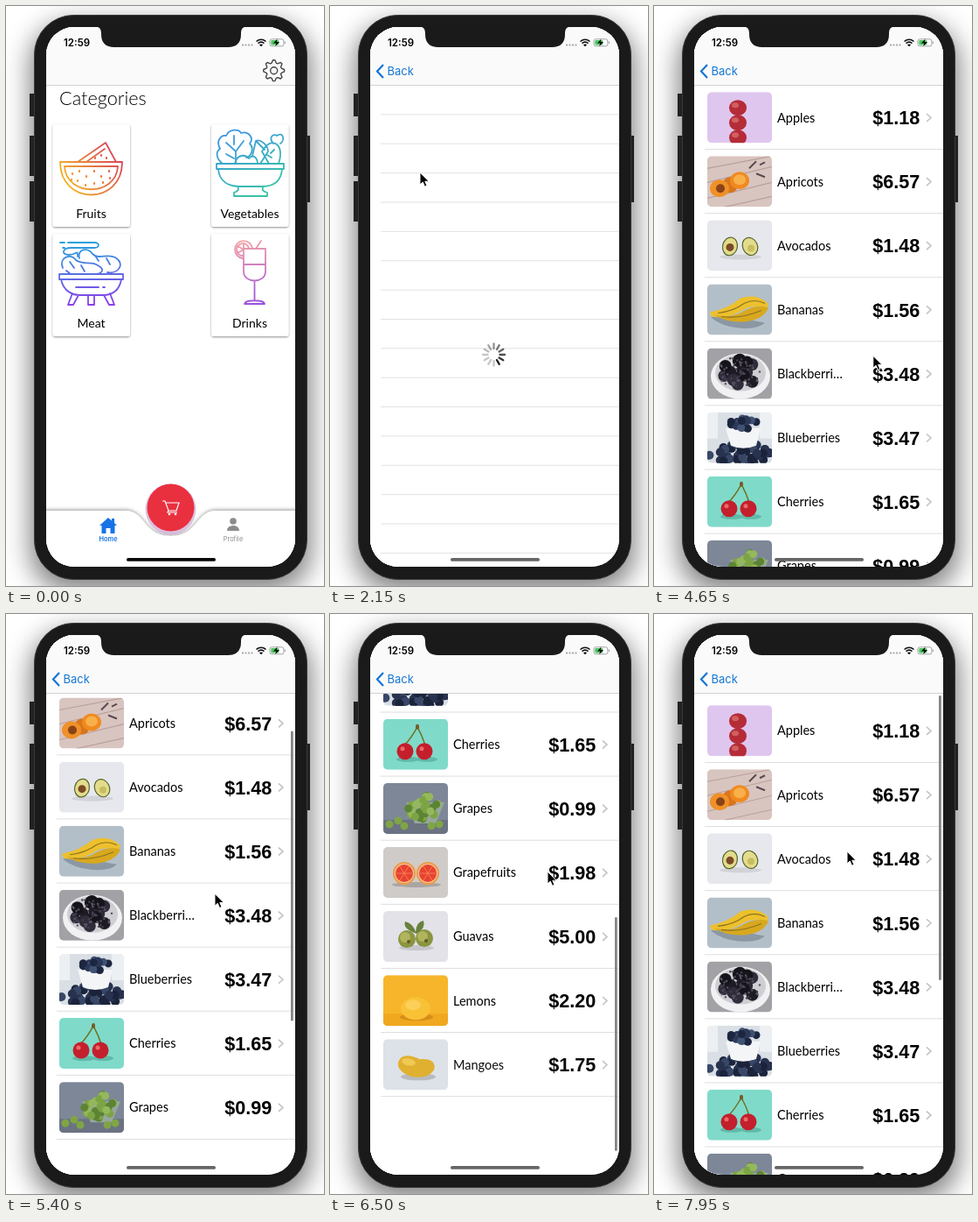
An HTML page that plays this animation: 364x662 px, repeating every 8 s.

```html
<!DOCTYPE html>
<html lang="en">
<head>
<meta charset="utf-8">
<title>Grocery app</title>
<style>
html, body { margin: 0; width: 100%; height: 100%; overflow: hidden; background: #fff; }
svg { display: block; width: 100%; height: 100%; }
text { font-family: Lato, "Open Sans", sans-serif; }
.ui { font-family: Inter, Roboto, sans-serif; }
.name { font-size: 14.5px; }
.price { font: bold 21.6px "Liberation Sans", Arial, sans-serif; text-anchor: end; }
.label { font-size: 14px; text-anchor: middle; }
.tab { font: 600 7.4px Inter, sans-serif; text-anchor: middle; }
.line { fill: none; stroke-width: 1.8; stroke-linecap: round; stroke-linejoin: round; }
</style>
</head>
<body>
<svg viewBox="0 0 364 662">
  <defs>
    <clipPath id="screen"><rect x="46" y="24" width="285" height="616" rx="32"/></clipPath>
    <clipPath id="photo"><rect width="74" height="58" rx="5"/></clipPath>
    <filter id="halo" x="-30%" y="-20%" width="160%" height="140%"><feGaussianBlur stdDeviation="15"/></filter>
    <filter id="cardShadow"><feDropShadow dx="0" dy="1" stdDeviation="1" flood-opacity=".45"/></filter>
    <filter id="barShadow" y="-50%" height="200%"><feDropShadow dx="0" dy="-1" stdDeviation="2" flood-opacity=".4"/></filter>
    <linearGradient id="fruitInk" gradientUnits="userSpaceOnUse" x1="62" y1="210" x2="130" y2="165"><stop stop-color="#f5c21c"/><stop offset="1" stop-color="#d83f5e"/></linearGradient>
    <linearGradient id="vegInk" gradientUnits="userSpaceOnUse" x1="250" y1="142" x2="290" y2="217"><stop stop-color="#3f92e8"/><stop offset="1" stop-color="#38c4a4"/></linearGradient>
    <linearGradient id="meatInk" gradientUnits="userSpaceOnUse" x1="90" y1="268" x2="98" y2="340"><stop stop-color="#25a3dc"/><stop offset="1" stop-color="#8a3fe8"/></linearGradient>
    <linearGradient id="drinkInk" gradientUnits="userSpaceOnUse" x1="270" y1="268" x2="286" y2="340"><stop stop-color="#f4a3a8"/><stop offset="1" stop-color="#9a50dc"/></linearGradient>
  </defs>

  <rect x="28" y="20" width="321" height="648" rx="46" opacity=".5" filter="url(#halo)"/>
  <path d="M27 100h6v26h-6zM27 148h6v46h-6zM27 200h6v46h-6zM344 148h4v76h-4z" fill="#222"/>
  <rect x="32.5" y="10.5" width="312" height="644" rx="45" fill="#1a1a1a" stroke="#3a3a3a"/>

  <g clip-path="url(#screen)">
    <rect x="46" y="24" width="285" height="616" fill="#fff"/>
    <g id="home">
      <rect x="46" y="24" width="285" height="616" fill="#fff"/>
      <text x="61" y="113" font-size="21.7" font-weight="300">Categories</text>
      <g id="cards"></g>

      <g class="line" stroke="url(#fruitInk)">
        <path d="M62 178H133C133 228 62 228 62 178ZM67 183H128C126 218 69 218 67 183M82 178L114 156L126 178M92 178L113 163"/>
        <path d="M76 191v1M84 188v1M92 194v1M101 188v1M109 194v1M118 188v1M82 199v1M91 204v1M101 202v1M111 201v1M102 173v1M109 170v1M115 173v1M75 198v1M119 196v1" stroke-width="2.2"/>
      </g>
      <g class="line" stroke="url(#vegInk)">
        <path d="M241 180H318V186H241ZM243 186C244 201 256 206 266 206H293C306 206 315 200 316 186M265 206Q268 211 261 213V217H299V213Q291 211 295 206"/>
        <path d="M248 180C240 174 240 166 245 163C240 154 246 147 252 148C255 140 267 140 269 145C278 142 284 151 279 157C285 163 280 172 275 173M252 156L263 166V179M263 166L272 154M252 169L261 174M261 148V158"/>
        <path d="M262 180C264 169 274 169 278 174C283 168 288 174 288 180M282 171L286 154L296 164M286 154C292 151 300 160 300 166L291 180M301 180L293 166Q302 152 310 158Q317 164 312 180M306 157C300 150 306 145 310 148C317 143 320 153 314 157M299 170l5 3M307 164l-4 4"/>
      </g>
      <g class="line" stroke="url(#meatInk)">
        <path d="M61 306H134V312H61ZM63 312C66 327 78 330 84 330H111C123 330 130 323 132 312M76 328L71 341H77L83 330M112 330L118 341H124L119 328M94 330V341H101V330"/>
        <path d="M65 299C60 286 75 282 80 290C88 296 99 291 105 296C115 301 109 306 101 306M84 288C81 277 94 275 99 283C106 290 116 282 125 287C137 294 129 306 116 304M73 292l5 7M86 296l4 7M102 285l4 6M115 288l4 7M74 306l-5-4"/>
        <path d="M62 270H67M71 270H101C108 270 107 276 101 276H75C64 276 63 284 72 284C81 284 82 277 82 286M65 276h2M80 321h26M111 321h2"/>
      </g>
      <g class="line" stroke="url(#drinkInk)" stroke-width="1.5">
        <path d="M272 277H297V303C297 317 272 317 272 303ZM272 295H297M284.500 314V336M273 340C274 335 295 335 296 340ZM286 277L292 268"/>
        <path d="M271 288A10 10 0 1 1 282 277M271 285A7 7 0 1 1 278 277M272 278L265 274M272 278V271M272 278L265 282"/>
      </g>

      <path d="M40 576H136C160 576 157 605 188.500 605S217 576 241 576H337V650H40Z" fill="#fff" filter="url(#barShadow)"/>
      <circle cx="188.500" cy="574.500" r="29" fill="#c9a2d2" opacity=".65"/>
      <circle cx="188.500" cy="572.500" r="27" fill="#e9303f"/>
      <path d="M179 565H182L186 576H195L198 567H183M186 576L185 578H196" fill="none" stroke="#fff" stroke-width="1.200"/>
      <circle cx="187" cy="580" r="1.300" fill="#fff"/><circle cx="194" cy="580" r="1.300" fill="#fff"/>
      <path d="M107 593L117 584L121 587.500V585H124V590L127 593H124.500V602H119.500V596H114.500V602H109.500V593Z" fill="#1673e6"/>
      <text class="tab" x="117" y="611" fill="#1673e6">Home</text>
      <circle cx="260" cy="588" r="3.800" fill="#8c8c8c"/><path d="M253 599C253 591 267 591 267 599Z" fill="#8c8c8c"/>
      <text class="tab" x="260" y="611" fill="#8c8c8c" style="font-weight:400">Profile</text>
    </g>

    <g id="list">
      <rect x="46" y="24" width="285" height="616" fill="#fff"/>
      <path id="emptyLines" stroke="#e2e2e2"/>
      <g id="rows"></g>
      <rect id="scrollbar" x="326" width="2.800" rx="1.400" fill="#858585"/>
      <g id="spinner" transform="translate(187.500 398)"></g>
    </g>

    <rect x="46" y="24" width="285" height="66.500" fill="#fafafa"/>
    <path d="M46 90.500H331" stroke="#d2d2d4"/>
    <g id="gear" fill="none" stroke="#444" stroke-width="1.400" transform="translate(306.700 73.700)"></g>
    <g id="back" fill="#1477d4">
      <path d="M61 67L54 74.500L61 82" fill="none" stroke="#1477d4" stroke-width="2.200"/>
      <text class="ui" x="65.500" y="79" font-size="13">Back</text>
    </g>
    <text class="ui" x="66" y="45.500" font-size="11.500" font-weight="600">12:59</text>
    <path d="M270 44.500h2m1.500 0h2m1.500 0h2m1.500 0h2" stroke="#aaa" stroke-width="2"/>
    <path d="M286.500 40.500Q292 36 297.500 40.500M288.500 42.700Q292 39.700 295.500 42.700" fill="none" stroke="#111" stroke-width="1.600"/><path d="M290 44.300Q292 42.600 294 44.300L292 46.300Z"/>
    <rect x="302" y="37.800" width="15.800" height="8" rx="2.200" fill="#fff" stroke="#999" stroke-width=".9"/>
    <rect x="303.300" y="39.100" width="9" height="5.400" rx="1" fill="#48c860"/>
    <path d="M310.500 37.500L306 42.500H309.200L308.200 46L313 41H309.600Z"/><path d="M319.300 40.500v2.600" stroke="#999"/>
    <rect id="indicator" x="138" y="630" width="102" height="3.800" rx="1.900"/>
  </g>
  <path d="M102 23.500C108 24 109 27 109 32Q109 47 124 47H254Q269 47 269 32C269 27 270 24 276 23.500Z" fill="#1a1a1a"/>
  <path id="cursor" d="M0 0V14L3.300 11L5.500 16.200L8 15.200L5.800 10.200H10.300Z" stroke="#fff" stroke-width="1"/>
</svg>

<script>
const $ = id => document.getElementById(id);
const LOOP = 8000, ROW = 73.1, TOP = 91, MAX_SCROLL = 353, LOADED = 3610;
const clamp = x => Math.max(0, Math.min(1, x));
const smooth = x => (x = clamp(x), x * x * (3 - 2 * x));

// Smooth curve through [time, value] keys, flat at every turning point.
function track(keys) {
  const slope = i => (keys[i + 1][1] - keys[i][1]) / (keys[i + 1][0] - keys[i][0]);
  const tangent = i => {
    if (i === 0 || i === keys.length - 1) return 0;
    const a = slope(i - 1), b = slope(i);
    return a * b <= 0 ? 0 : 2 * a * b / (a + b);
  };
  return t => {
    if (t <= keys[0][0]) return keys[0][1];
    const i = keys.findIndex((k, n) => n < keys.length - 1 && t < keys[n + 1][0]);
    if (i < 0) return keys[keys.length - 1][1];
    const [t0, v0] = keys[i], [t1, v1] = keys[i + 1], d = t1 - t0, u = (t - t0) / d;
    return v0 + (v1 - v0) * u * u * (3 - 2 * u)
      + d * u * (1 - u) * ((1 - u) * tangent(i) - u * tangent(i + 1));
  };
}

const scrollAt = track([[5250, 0], [5400, 75], [5520, 258], [5600, 345], [5720, 392], [6000, 353], [6120, 353],
  [6500, 417], [6700, 404], [7025, 359], [7250, 218], [7400, 90], [7500, 25], [7620, -22], [7950, -6], [8000, -4]]);
const cursorX = track([[100, 372], [850, 103], [3450, 103], [3950, 258], [5250, 241], [5400, 239], [5600, 238],
  [6120, 252], [6500, 249], [7250, 230], [7950, 221]]);
const cursorY = track([[100, 400], [850, 190], [3450, 190], [3950, 401], [5250, 395], [5400, 320], [5560, 110],
  [6120, 426], [6500, 294], [6700, 324], [7025, 414], [7250, 561], [7350, 588], [7950, 271]]);

// Thumbnail drawing, in a 74 by 58 box
const ball = (x, y, r, fill, ry = r, turn = 0) =>
  `<ellipse cx="${x}" cy="${y}" rx="${r}" ry="${ry}" fill="${fill}" transform="rotate(${turn} ${x} ${y})"/>`;
const path = (d, fill, stroke = 'none', width = 1) =>
  `<path d="${d}" fill="${fill}" stroke="${stroke}" stroke-width="${width}"/>`;
function pile(count, x, y, rx, ry, r, fills) {
  let seed = count * 7 + x, out = '';
  const random = () => (seed = (seed * 16807 + 11) % 2147483647) / 2147483647;
  random(); random();
  for (let i = 0; i < count; i++) {
    const a = random() * 6.283, d = Math.sqrt(random());
    out += ball((x + rx * d * Math.cos(a)).toFixed(1), (y + ry * d * Math.sin(a)).toFixed(1), r, fills[i % fills.length]);
  }
  return out;
}
const apple = y => ball(35, y, 10, '#b52c38', 9) + ball(32, y - 3, 4, '#d0605f', 3);
const citrus = x => ball(x, 30, 13, '#ee9a45') + ball(x, 30, 11, '#f3c79c') + ball(x, 30, 10, '#e8432f') +
  path(`M${x - 9} 30h18M${x - 5} 22l10 16M${x + 5} 22l-10 16`, 'none', '#f58a68', .8);
const avocado = (x, turn) => ball(x, 30, 9, '#55682c', 11, turn) + ball(x, 30, 7.8, '#e3dc8c', 9.8, turn);
const guava = (x, y) => ball(x, y, 10, '#8b9440') + ball(x - 2, y - 2, 6, '#b0b45c') + ball(x + 2, y + 3, 2, '#5d5a28');

const fruits = [
  ['Apples', '1.18', '#dfc6ee', apple(52) + apple(35) + apple(18)],
  ['Apricots', '6.57', '#d9c5c0', path('M0 14L74 0M0 30L74 12M0 48L74 30M20 58L74 46', 'none', '#b9a09c', 1.2) +
    path('M48 14l8 -8M56 20l10 4M60 10l6 -3', 'none', '#5a4a50', 2) + ball(26, 33, 9, '#d9761c') +
    ball(37, 28, 11, '#f08a20', 10) + ball(37, 27, 7, '#f7b04a', 6) + ball(14, 37, 11, '#ef9128', 10) + ball(15, 37, 5, '#8a4316')],
  ['Avocados', '1.48', '#e7e8ed', ball(38, 42, 24, '#d2d3d8', 3) + avocado(26, 12) + ball(26, 31, 4.5, '#7b4a26') + avocado(49, -25) + ball(50, 32, 4, '#c9bd62')],
  ['Bananas', '1.56', '#b3bfc8', path('M7 37Q36 38 66 44Q58 52 36 50Q16 48 4 38Z', '#8b98a4') +
    path('M3 32Q24 28 38 16Q58 10 70 23L68 28Q52 22 38 31Q22 40 5 37Z', '#edc02c') +
    path('M8 35Q28 40 43 30Q58 23 70 27Q64 41 42 43Q22 44 8 35Z', '#d8a81e') + path('M12 33Q30 31 42 22Q54 16 66 22M16 37Q38 40 62 30', 'none', '#8d7420', 1.2)],
  ['Blackberri…', '3.48', '#a2a2a6', ball(38, 32, 34, '#f1f1f3', 26) + ball(38, 28, 29, '#cfcfd3', 21) +
    pile(15, 37, 28, 21, 15, 7, ['#1e1b25', '#302c3a', '#16141b']) + pile(60, 37, 28, 25, 18, 1.2, ['#5a5566', '#454151'])],
  ['Blueberries', '3.47', '#d9dfe5', path('M0 0H12V30H0ZM60 0H74V30H60Z', '#edf0f3') + pile(45, 37, 47, 37, 12, 5, ['#27324f', '#384767', '#1b233b']) +
    path('M21 18H61L56 38Q41 44 27 38Z', '#f4f5f6') + pile(18, 41, 14, 17, 7, 4.5, ['#2c3857', '#405274', '#1d2640'])],
  ['Cherries', '1.65', '#80dac9', ball(28, 46, 13, '#61b9aa', 3) + ball(50, 46, 12, '#61b9aa', 3) +
    path('M24 30Q32 22 39 9Q45 20 48 30', 'none', '#6a7526', 1.5) + ball(39, 9, 2, '#7a5a24', 3) +
    ball(25, 37, 9.5, '#c41f2c') + ball(47, 37, 9.5, '#c41f2c') + ball(22, 34, 2.5, '#ea6a68') + ball(44, 34, 2.5, '#ea6a68')],
  ['Grapes', '0.99', '#7d8798', path('M0 42H74V58H0Z', '#6b7282') + path('M26 22H70L60 46H36Z', '#95a79c') +
    pile(28, 47, 28, 19, 14, 4.5, ['#7da444', '#5d8434', '#94b85c']) + [[7, 47], [17, 43], [24, 49], [55, 49], [64, 47]].map(p => ball(...p, 4.5, '#7fa545')).join('')],
  ['Grapefruits', '1.98', '#cfcbc8', ball(38, 43, 28, '#aaa5a2', 3) + citrus(24) + citrus(51)],
  ['Guavas', '5.00', '#e2e2e8', ball(38, 42, 20, '#c6c6cd', 3) + path('M36 25Q22 20 25 12Q34 14 37 24Q38 12 46 11Q49 20 38 26Z', '#68823c') + guava(27, 32) + guava(47, 31)],
  ['Lemons', '2.20', '#f6b52b', path('M0 44H74V58H0Z', '#f0a81f') + ball(38, 48, 19, '#d68e18', 4) + ball(37, 38, 17, '#f9c136', 13) + ball(34, 34, 9, '#fccf58', 6)],
  ['Mangoes', '1.75', '#dce1e7', ball(40, 43, 20, '#b5b7ba', 4) + path('M17 27C20 15 34 19 42 23C54 21 61 27 58 35C52 46 32 45 24 39Q16 34 17 27Z', '#dfac26') + ball(29, 26, 8, '#efc84a', 4, 12)]
];

$('rows').innerHTML = fruits.map(([name, price, tone, art], i) => `<g transform="translate(0 ${TOP + i * ROW})">
  <g transform="translate(61 7.2)" clip-path="url(#photo)"><rect width="74" height="58" fill="${tone}"/>${art}</g>
  <text class="name" x="141" y="41.5">${name}</text><text class="price" x="304.300" y="44.3">$${price}</text>
  <path d="M312 32L317 36.500L312 41" fill="none" stroke="#c3c3c7" stroke-width="1.600"/><path d="M58 72.500H331" stroke="#dedee0"/></g>`).join('');

$('cards').innerHTML = [['Fruits', 53.5, 135], ['Vegetables', 235, 135], ['Meat', 53.5, 260], ['Drinks', 235, 260]]
  .map(([name, x, y]) => `<rect x="${x}" y="${y}" width="88.500" height="117" rx="3" fill="#fff" filter="url(#cardShadow)"/>
    <text class="label" x="${x + 44}" y="${y + 107}">${name}</text>`).join('');

$('emptyLines').setAttribute('d', Array.from({ length: 16 }, (_, i) => `M58 ${(90.5 + 33.37 * (i + 1)).toFixed(1)}H331`).join(''));
$('spinner').innerHTML = Array.from({ length: 12 }, (_, i) => `<path d="M0 -7V-12.500" stroke="#222" stroke-width="2.300" stroke-linecap="round" transform="rotate(${i * 30})"/>`).join('');

const teeth = Array.from({ length: 32 }, (_, i) => {
  const r = i % 4 < 2 ? 12 : 9, a = (i - .5) * Math.PI / 16;
  return `${(r * Math.sin(a)).toFixed(1)} ${(-r * Math.cos(a)).toFixed(1)}`;
});
$('gear').innerHTML = `<path d="M${teeth.join('L')}Z" stroke-linejoin="round"/><circle r="4"/>`;

// A row fades in each time it enters the screen, later rows after a longer delay.
const entries = fruits.map((_, i) => {
  const times = [];
  let visible = false;
  for (let t = LOADED; t < LOOP; t += 5) {
    const y = TOP + i * ROW - scrollAt(t), now = y < 640 && y + ROW > 24;
    if (now && !visible) times.push(t);
    visible = now;
  }
  return times;
});
function rowAlpha(i, t) {
  const entered = entries[i].filter(e => e <= t).pop();
  return entered === undefined ? 0 : smooth((t - entered - 50 * i) / 500);
}

const rows = [...$('rows').children], spokes = [...$('spinner').children];
const move = (id, x, y) => $(id).setAttribute('transform', `translate(${x} ${y})`);
const fade = (el, alpha) => el.style.opacity = alpha;

function draw(t) {
  const push = 1 - (1 - clamp((t - 1200) / 600)) ** 3;
  move('home', -85 * push, 0);
  move('list', 285 * (1 - push), 0);
  fade($('gear'), 1 - push);
  fade($('back'), push);
  $('indicator').setAttribute('fill', push < .5 || (t > 7080 && t < 7450) ? '#080808' : '#666');

  const loading = t < LOADED;
  fade($('emptyLines'), +loading);
  fade($('spinner'), +loading);
  const head = Math.floor(t * 12 / 1000) + 4;
  spokes.forEach((s, i) => fade(s, Math.max(.25, 1 - ((head - i) % 12) * .1)));

  const scroll = scrollAt(t), over = Math.max(0, -scroll, scroll - MAX_SCROLL), length = 331 - over;
  move('rows', 0, -scroll);
  rows.forEach((row, i) => fade(row, rowAlpha(i, t)));
  $('scrollbar').setAttribute('height', length);
  $('scrollbar').setAttribute('y', scroll > MAX_SCROLL ? 613 - length : 93 + Math.max(0, scroll) * .535);
  fade($('scrollbar'), clamp((t - 5250) / 100));

  fade($('cursor'), +(t > 100));
  move('cursor', cursorX(t), cursorY(t));
}

const start = performance.now();
function frame(now) {
  draw(Math.max(0, now - start) % LOOP);
  requestAnimationFrame(frame);
}
draw(0);
requestAnimationFrame(frame);
</script>
</body>
</html>
```
